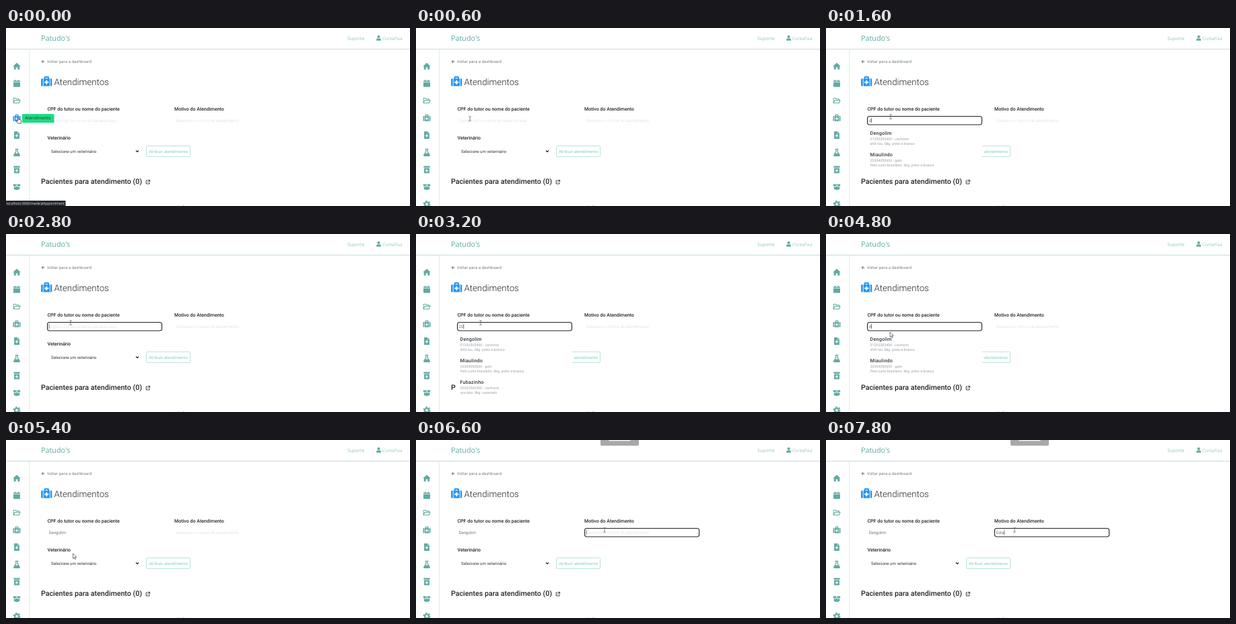
Recreate the animation shown at these times as an HTML page. Size 600x265 px, loop 8000 ms.

```html
<!DOCTYPE html>
<html lang="pt-BR">
<head>
<meta charset="utf-8">
<title>Atendimentos</title>
<style>
  html, body { margin: 0; width: 100%; height: 100%; overflow: hidden; background: #fff; }
  svg { display: block; width: 600px; height: 265px; font-family: Roboto, "Liberation Sans", sans-serif; }
  text { text-rendering: geometricPrecision; white-space: pre; }
  .nav { font-family: "Open Sans", "Noto Sans", sans-serif; }
  .label { font-size: 7.06px; font-weight: 500; fill: #212529; }
  .field { font-size: 6.15px; font-weight: 300; fill: #333; }
  .hint { font-size: 6.13px; font-weight: 300; fill: #d3d7da; }
  .name { font-size: 7.2px; font-weight: 500; letter-spacing: .2px; fill: #343a40; }
  .info { font-size: 5.3px; fill: #989fa6; }
  .focus { fill: none; stroke: #202225; stroke-width: 1.1; }
  .caret { stroke: #222; stroke-width: .6; }
  .side { color: #62aaa2; }
</style>
</head>
<body>
<svg viewBox="0 0 600 265">
  <defs>
    <symbol id="home" viewBox="0 0 16 16"><path fill="currentColor" d="M8 1 16 8.3h-2V15H9.8v-4.6H6.2V15H2V8.3H0z"/></symbol>
    <symbol id="calendar" viewBox="0 0 16 16"><path fill="currentColor" d="M3.6.5h2v2h4.8v-2h2v2H15V5H1V2.5h2.6zM1 6h14v8.5q0 1-1 1H2q-1 0-1-1z"/></symbol>
    <symbol id="folder" viewBox="0 0 16 16"><path fill="none" stroke="currentColor" stroke-width="1.5" stroke-linejoin="round" d="M1 13V3h4.7l1.6 1.6h5.5v2.6M1 13.2l2.8-6h11.4l-2.6 6z"/></symbol>
    <symbol id="kit" viewBox="0 0 16 16">
      <path fill="currentColor" d="M1.5 4h1.1v11H1.5Q0 15 0 13.5v-8Q0 4 1.5 4zM13.4 4h1.1Q16 4 16 5.5v8q0 1.5-1.5 1.5h-1.1zM3.5 4h1V2.3Q4.5 1 5.8 1h4.4q1.3 0 1.3 1.3V4h1v11h-9zM6.3 4h3.4V2.8H6.3z"/>
      <path fill="#fff" d="M7.1 6.5h1.8v2.1H11v1.8H8.9v2.1H7.1v-2.1H5V8.6h2.1z"/>
    </symbol>
    <symbol id="file" viewBox="0 0 16 16">
      <path fill="currentColor" d="M2.5 0h7v4.2h4V15q0 1-1 1h-9q-1 0-1-1zM10.3 0l3.2 3.4h-3.2z"/>
      <path fill="#fff" d="M7.1 6h1.8v2.2H11V10H8.9v2.2H7.1V10H5V8.2h2.1z"/>
    </symbol>
    <symbol id="flask" viewBox="0 0 16 16">
      <path fill="currentColor" d="M4.7 0h6.6v2h-.8v4l4.3 7.5Q15.6 16 13.5 16h-11Q.4 16 1.2 13.5L5.5 6V2h-.8z"/>
      <path fill="#fff" d="M7.2 2h1.6v4.5l1.8 3.2H5.4l1.8-3.2z"/>
    </symbol>
    <symbol id="bottle" viewBox="0 0 16 16">
      <path fill="currentColor" d="M1.5 0h13v3.6h-13zM2.5 4.7h11V15q0 1-1 1h-9q-1 0-1-1z"/>
      <path fill="#fff" d="M7.1 7h1.8v2.1H11v1.8H8.9V13H7.1v-2.1H5V9.1h2.1z"/>
    </symbol>
    <symbol id="box" viewBox="0 0 16 16"><path fill="currentColor" d="M1.5 2 8 3l6.5-1L16 5.5l-5.2 1.7L8 3.8 5.2 7.2 0 5.5zM2 7.1l3.7 1.3L8 5.7l2.3 2.7L14 7.1v5.7L8 14.5l-6-1.7z"/></symbol>
    <symbol id="gear" viewBox="0 0 16 16">
      <g fill="none" stroke="currentColor"><circle cx="8" cy="8" r="4.2" stroke-width="3.2"/><circle cx="8" cy="8" r="6.7" stroke-width="2.2" stroke-dasharray="3.5"/></g>
    </symbol>
    <path id="arrow" d="M0 0v7.4l1.7-1.5 1.2 2.6 1.2-.5-1.2-2.6h2.3z" fill="#fff" stroke="#222" stroke-width=".6"/>
    <path id="beam" d="M-1.7-3.2h1.2l.5.4.5-.4h1.2M0-2.8v5.6M-1.7 3.2h1.2l.5-.4.5.4h1.2" fill="none" stroke="#555" stroke-width=".75"/>
    <path id="hand" d="M-.8 0q.8-.9 1.5 0v3.2l3.3.8q1 .4.8 1.4L4.2 9H-.4L-3 5.7q.2-1.1 1.2-.5l1 .8z" fill="#fff" stroke="#222" stroke-width=".7"/>
  </defs>
  <rect width="600" height="265" fill="#fff"/>

  <g class="nav">
    <text x="52" y="19.2" font-size="10.8" font-weight="500" fill="#5cab9f">Patudo's</text>
    <text x="507" y="18" font-size="6.85" fill="#8ac6bd">Suporte</text>
    <text x="559" y="18" font-size="6.4" fill="#8ac6bd">ContaFixa</text>
    <path d="M550 18.7v-1.3q0-2 2-2h3q2 0 2 2v1.3z" fill="#62aaa2"/>
    <circle cx="553.5" cy="13" r="2.1" fill="#62aaa2"/>
    <path d="M57.3 50h-4m1.9-2-2 2 2 2" fill="none" stroke="#444" stroke-width=".8"/>
    <text x="61" y="52.2" font-size="5.9" fill="#666b70">Voltar para a dashboard</text>
  </g>
  <rect y="31" width="600" height="1" fill="#c3dcd9"/>
  <rect x="34" y="32" width="1" height="233" fill="#dcefec"/>
  <g id="side" class="side"></g>

  <use href="#kit" x="52" y="71" width="16.5" height="16.5" color="#2196f3"/>
  <text x="71.5" y="84.5" font-size="13.3" font-weight="300" fill="#212529">Atendimentos</text>

  <text class="label" x="61.5" y="122.9">CPF do tutor ou nome do paciente</text>
  <text class="label" x="250" y="122.9">Motivo do Atendimento</text>
  <text class="label" x="61.5" y="166.3">Veterinário</text>
  <text x="67" y="185.9" font-size="6.17" fill="#333">Selecione um veterinário</text>
  <path d="m193 182.5 2 2 2-2" fill="none" stroke="#222" stroke-width="1.2"/>
  <rect x="208.5" y="175.5" width="65" height="16" rx="1.2" fill="#fff" stroke="#b4e0d9" stroke-width=".9"/>
  <text class="nav" x="212.3" y="185.5" font-size="5.92" fill="#70c4b7">Atribuir atendimento</text>
  <text x="52" y="231.9" font-size="10.66" font-weight="500" fill="#212529">Pacientes para atendimento (0)</text>
  <path d="M210.5 227h-2.3v5h4.8v-2.3M211 226.5h2.6v2.6m0-2.6-3.6 3.6" fill="none" stroke="#333" stroke-width=".9"/>
  <path d="M255 264h2v1h-2zM262 264h3v1h-3z" fill="#d0d3d5"/>

  <g id="menu"></g>
  <g id="fields"></g>

  <g id="tip" class="nav">
    <rect x="24" y="128" width="47.5" height="13" rx="1.5" fill="#1fdc83"/>
    <text x="28.3" y="136.4" font-size="6.3" fill="#17382c">Atendimento</text>
  </g>
  <g id="status" class="nav">
    <rect y="257" width="88.5" height="8" fill="#24282e"/>
    <text x="1" y="263" font-size="5.08" fill="#e8eaed">localhost:3000/medicalAppointment</text>
  </g>
  <g id="bar">
    <path d="M274 0h57v6.5q0 2-2 2h-53q-2 0-2-2z" fill="#a8a8a8"/>
    <rect x="286.5" width="32" height="1.4" fill="#f4f4f4"/>
  </g>
  <use id="cursor"/>
</svg>
<script>
const LOOP = 8000;
const $ = id => document.getElementById(id);

const pets = [
  ["Dengolim", "01202303400", "cachorro", "shih tzu. 6kg. preto e branco"],
  ["Miaulindo", "20304050600", "gato", "Pelo curto brasileiro. 6kg. preto e branco"],
  ["Fubazinho", "20202020200", "cachorro", "vira-lata. 8kg. caramelo"]
];

// Each row changes part of the state and holds until the next row.
const steps = [
  [0, { cursor: "hand", at: [18, 133], tip: 1, status: 1, bar: 0, focus: "", patient: "", reason: "" }],
  [200, { cursor: "arrow", at: [30, 140], tip: 0 }],
  [400, { at: [52, 138], status: 0 }],
  [600, { cursor: "beam", at: [80, 135] }],
  [800, { at: [96, 132] }],
  [1000, { focus: "patient" }],
  [1600, { patient: "d" }],
  [2000, { patient: "de" }],
  [2200, { patient: "den" }],
  [2800, { patient: "" }],
  [3000, { patient: "2" }],
  [3200, { patient: "20" }],
  [3800, { patient: "2" }],
  [4000, { patient: "" }],
  [4200, { patient: "d" }],
  [4800, { cursor: "arrow", at: [95, 146] }],
  [5000, { at: [91, 157] }],
  [5200, { patient: pets[0][0], focus: "" }],
  [5400, { at: [99.5, 169] }],
  [5600, { at: [164, 162] }],
  [5800, { at: [263, 146] }],
  [6000, { cursor: "beam", at: [276, 136] }],
  [6200, { at: [280, 134] }],
  [6400, { focus: "reason", bar: 1 }],
  [7000, { reason: "E" }],
  [7200, { reason: "Es" }],
  [7600, { reason: "Est" }],
  [7800, { reason: "Esta" }]
];

const inputs = [
  { key: "patient", x: 61.5, hint: "Digite o cpf ou nome do paciente aqui" },
  { key: "reason", x: 250.5, hint: "Descreva o motivo do atendimento" }
];

const text = (cls, x, y, s) => `<text class="${cls}" x="${x}" y="${y}">${s}</text>`;

function stateAt(t) {
  return Object.assign({}, ...steps.filter(s => s[0] <= t).map(s => s[1]));
}

function drawSide(hover) {
  const icons = ["home", "calendar", "folder", "kit", "file", "flask", "bottle", "box", "gear"];
  $("side").innerHTML = icons.map((id, i) => {
    const color = hover && id === "kit" ? ' color="#2196f3"' : "";
    return `<use href="#${id}" x="10.3" y="${51 + i * 25.7}" width="11.4" height="11.4"${color}/>`;
  }).join("");
}

function drawMenu(s) {
  const q = s.patient;
  const open = s.focus === "patient" && q;
  const found = open ? pets.filter(p => p[0].toLowerCase().includes(q) || p[1].includes(q)) : [];
  const rows = found.map(([name, cpf, kind, note], i) => {
    const y = i * 32.3;
    return text("name", 65.5, 158.5 + y, name) +
      text("info", 65.5, 166.7 + y, `${cpf} - ${kind}`) +
      text("info", 65.5, 173.8 + y, note);
  });
  $("menu").innerHTML = found.length
    ? `<rect x="59" y="146" width="173" height="${32.3 * found.length}" fill="#fff"/>` + rows.join("")
    : "";
}

function drawFields(s) {
  $("fields").innerHTML = inputs.map(({ key, x, hint }) => {
    const value = s[key];
    const focus = s.focus === key;
    return (focus ? `<rect class="focus" x="${x}" y="131.5" width="170" height="12.5" rx="3.2"/>` : "") +
      text(value ? "field" : "hint", x + 2, 139.8, value || hint) +
      (focus ? '<path class="caret"/>' : "");
  }).join("");
  const caret = document.querySelector(".caret");
  if (caret) {
    const label = caret.previousElementSibling;
    const end = s[s.focus] ? label.getComputedTextLength() : 0;
    caret.setAttribute("d", `M${+label.getAttribute("x") + end + .5} 134.2v7`);
  }
}

function draw(s) {
  for (const id of ["tip", "status", "bar"]) $(id).style.display = s[id] ? "" : "none";
  drawSide(s.tip);
  drawMenu(s);
  drawFields(s);
  $("cursor").setAttribute("href", "#" + s.cursor);
  $("cursor").setAttribute("transform", `translate(${s.at})`);
}

const start = performance.now();
let shown = -1;
function tick() {
  const t = (performance.now() - start) % LOOP;
  const now = steps.filter(s => s[0] <= t).length;
  if (now !== shown) {
    draw(stateAt(t));
    shown = now;
  }
  requestAnimationFrame(tick);
}
tick();
</script>
</body>
</html>
```
